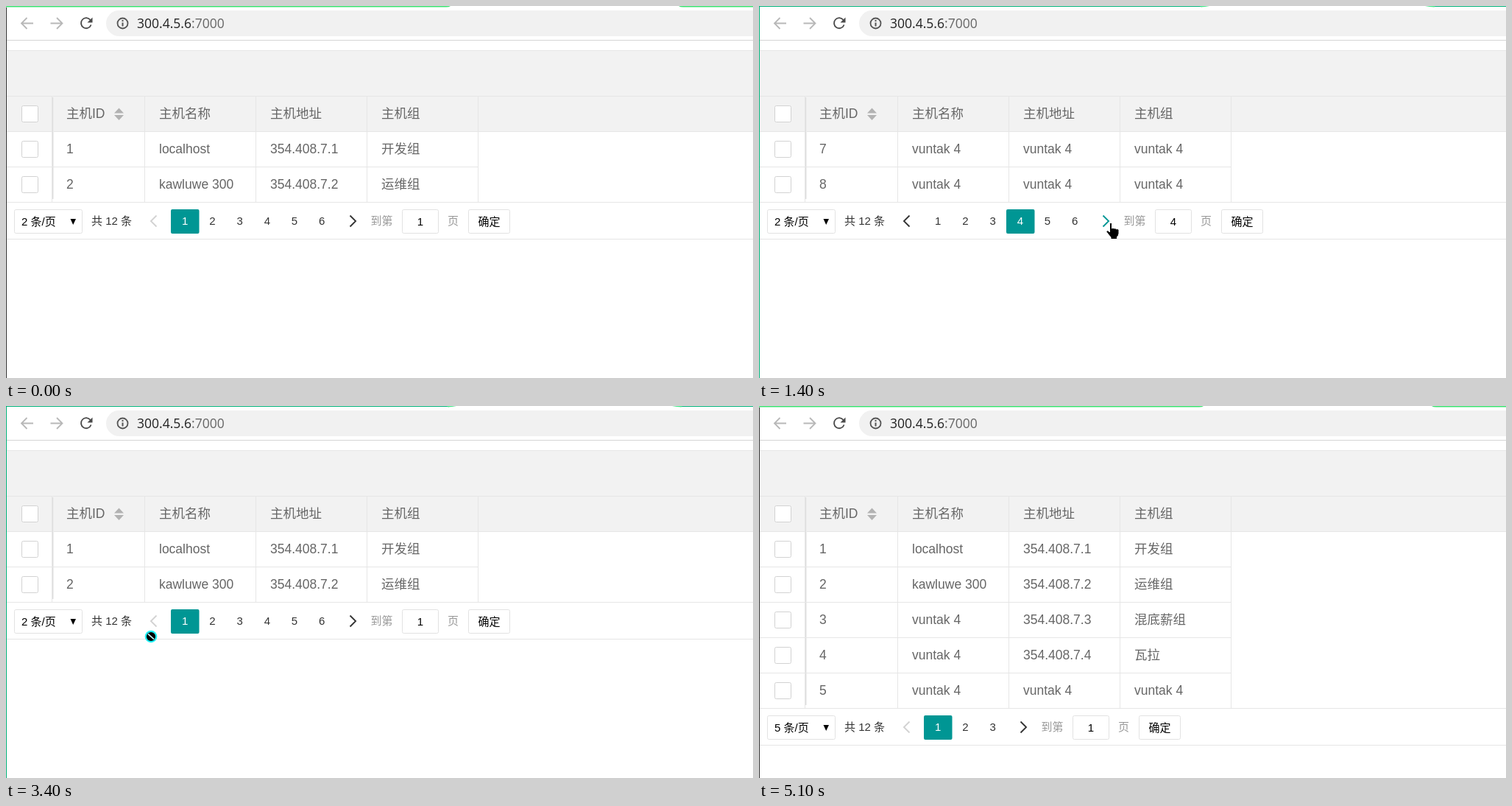
These frames come from a looping animation (1015x505 px, 5200 ms). An HTML page:

```html
<!DOCTYPE html>
<html lang="zh-CN">
<head>
<meta charset="utf-8">
<title>主机列表</title>
<style>
  html, body { margin: 0; width: 100%; height: 100%; overflow: hidden; background: #fff; }
  svg { display: block; width: 1015px; height: 505px; isolation: isolate; }
  text { font: 15px "Liberation Sans", "Noto Sans CJK SC", "Noto Sans CJK", sans-serif; white-space: pre; }
  .cell { font-size: 17.5px; fill: #666; }
  .url { font-family: "Open Sans", sans-serif; font-size: 17.5px; }
  .mid { text-anchor: middle; }
  .stroke { fill: none; stroke-width: 1.8; }
  .invert { mix-blend-mode: difference; fill: #fff; }
</style>
</head>
<body>
<svg id="stage" viewBox="0 0 1015 505">
  <rect width="1015" height="505" fill="#fff"/>
  <g id="chrome"></g>
  <g id="page"></g>
  <g id="cursor"></g>
</svg>
<script>
const LOOP = 5200, STEP = 100, ROW = 48;
const TEAL = '#009694', LINE = '#e6e6e6', EDGE = '#e2e2e2';
const SIZES = [2, 5, 10, 15, 20, 25];
const GROUPS = ['开发组', '运维组', '混底薪组', '瓦拉'];
const NAMES = ['localhost', 'kawluwe 300'];
const COMMON = 'vuntak 4';
const $ = id => document.getElementById(id);

const rect = (x, y, w, h, fill, extra = '') =>
  `<rect x="${x}" y="${y}" width="${w}" height="${h}" fill="${fill}" ${extra}/>`;
const box = (x, y, w, h, edge = EDGE, fill = '#fff') =>
  rect(x + .5, y + .5, w - 1, h - 1, fill, `rx="2" stroke="${edge}"`);
const hline = (y, w = 1014) => rect(1, y, w, 1, LINE);
const vline = (x, y, h) => rect(x, y, 1, h, LINE);
const label = (x, y, str, fill = '#333', cls = '') =>
  `<text x="${x}" y="${y}" fill="${fill}" class="${cls}">${str}</text>`;
const cell = (x, y, str) => label(x, y, str, '#666', 'cell');
const stroke = (d, color) => `<path d="${d}" class="stroke" stroke="${color}"/>`;
const shape = (d, fill) => `<path d="${d}" fill="${fill}"/>`;

// Every entry holds from its time until the next one.
const EVENTS = [
  [0, { page: 1, size: 2, input: 1, recording: false, hover: false, focus: false, selected: false, open: false, lit: -1, shown: 2 }],
  [500, { hover: true }],
  [800, { page: 2, input: 2, recording: true }],
  [1100, { page: 3, input: 3 }],
  [1400, { page: 4, input: 4 }],
  [1700, { page: 5, input: 5 }],
  [2000, { page: 6, input: 6, hover: false }],
  [2300, { focus: true }],
  [2500, { selected: true }],
  [2800, { input: 1, selected: false }],
  [3100, { page: 1, focus: false }],
  [3800, { open: true, lit: 0 }],
  [4000, { lit: 1 }],
  [4300, { open: false, shown: 5 }],
  [4500, { size: 5 }],
  [5100, { recording: false }]
];

// time, x, y, pointer kind
const PATH = [
  [100, 794, 234, 'arrow'], [500, 480, 289, 'hand'], [600, 476, 291, 'hand'],
  [1100, 478, 294, 'hand'], [2000, 500, 303, 'blocked'], [2100, 528, 302, 'arrow'],
  [2200, 565, 301, 'beam'], [2300, 592, 301, 'arrow'], [2400, 574, 301, 'beam'],
  [2500, 548, 302, 'beam'], [2600, 519, 306, 'arrow'], [2800, 560, 308, 'arrow'],
  [3000, 660, 308, 'hand'], [3100, 659, 299, 'hand'], [3200, 500, 303, 'arrow'],
  [3300, 320, 305, 'arrow'], [3400, 197, 313, 'blocked'], [3500, 140, 305, 'arrow'],
  [3700, 72, 298, 'arrow'], [3800, 70, 298, 'arrow'], [4000, 55, 337, 'arrow'],
  [4400, 55, 337, 'arrow'], [4800, 900, 400, 'arrow'], [4900, 1020, 420, 'none']
];

const POINTERS = {
  arrow: '<path class="invert" d="M0 0V14.5L3.3 11.5 5.8 17 8 16 5.6 10.6H10.2Z"/>',
  beam: '<path class="invert" d="M-3 -8H-.5V8H-3V9H4V8H1.5V-8H4V-9H-3Z"/>',
  hand: '<path stroke="#fff" d="M-1.5 1.5Q0 -1.5 1.5 1.5V8Q3 6.5 4.5 8Q6 7 7.5 8.8Q10 7.5 11 10.5V15Q10.5 18 8.5 19.5V22.5H0V20Q-3.5 16 -6 12.5Q-6 9.8 -3.5 11L-1.5 13Z"/>',
  blocked: '<circle r="8.3" fill="#1ceff4"/><circle r="6.1"/><path d="M-4 -3.6L4 3.6" stroke="#bff8fa" stroke-width="1.6"/>',
  none: ''
};

function stateAt(time) {
  return Object.assign({}, ...EVENTS.filter(e => e[0] <= time).map(e => e[1]));
}

function drawChrome(recording) {
  const frame = recording ? '#00b27a' : '#3ee373';
  const depth = recording ? 1 : 1.6;
  const pale = '#42e889';
  $('chrome').innerHTML =
    shape(`M0 0H604Q602 ${depth} 598 ${depth}H0ZM914 0H1015V${depth}H920Q916 ${depth} 914 0Z`, frame) +
    (recording ? shape('M600 0H612Q606 1.4 600 1.4ZM905 0H918V1.4Q911 1.4 905 0Z', pale) : '') +
    rect(0, recording ? 0 : 2, 1, 505, recording ? frame : '#333') +
    stroke('M37 23.5H21.5M28.5 16L21 23.5 28.5 31M60.5 23.5H76M69 16L76.5 23.5 69 31', '#b8b8b8') +
    stroke('M114.6 19A7 7 0 1 0 115.6 25.5', '#4a4a4a') +
    shape('M117.5 15.5V22.5H110.5Z', '#4a4a4a') +
    rect(136, 6, 900, 35, '#f1f1f1', 'rx="17.5"') +
    '<circle cx="158.5" cy="23.5" r="7" class="stroke" stroke="#555"/>' +
    rect(157.5, 22.5, 2, 5, '#555') + rect(157.5, 19, 2, 2, '#555') +
    label(178, 30, '300.4.5.6<tspan fill="#666">:7000</tspan>', '#222', 'url') +
    hline(46).replace(LINE, '#d4d4d4');
}

function drawTable(s) {
  const bottom = 170 + ROW * s.size;
  let out = rect(1, 60, 1014, 111, '#f2f2f2') + [60, 122, 170].map(y => hline(y)).join('');
  out += [188, 339, 490, 641].map(x => vline(x, 123, bottom - 123)).join('');
  out += vline(62, 123, bottom - 123) + rect(63, 124, 1, bottom - 128, '#dedede') + rect(64, 124, 1, bottom - 128, '#efefef');
  out += ['主机ID', '主机名称', '主机地址', '主机组']
    .map((title, i) => cell([82, 208, 359, 510][i], 152, title)).join('');
  out += shape('M147 145.5L153.5 138.5 160 145.5ZM147 148L153.5 155 160 148Z', '#b2b2b2');
  out += box(21, 135, 23, 23, '#d2d2d2');
  for (let r = 0; r < s.size; r++) {
    const index = (s.page - 1) * s.size + r, y = 200 + ROW * r;
    const address = index < 4 ? '354.408.7.' + (index + 1) : COMMON;
    out += box(21, y - 17, 23, 23, '#d2d2d2') + cell(82, y, index + 1) +
      cell(208, y, NAMES[index] || COMMON) + cell(359, y, address) +
      cell(510, y, GROUPS[index] || COMMON);
    if (r < s.size - 1) out += hline(y + 18, 641);
  }
  return out + hline(bottom);
}

function drawPager(s) {
  const pages = Math.ceil(12 / s.size), pitch = 37.2;
  const chevron = (x, dir, color) => stroke(`M${x - dir * 4} 284.5L${x + dir * 3.6} 292 ${x - dir * 4} 299.5`, color);
  const shift = Math.round((pages - 6) * pitch);
  const nextColor = s.page === pages ? '#d2d2d2' : s.hover ? TEAL : '#333';
  let out = box(11, 276, 93, 33, s.open ? TEAL : EDGE) + label(21, 298, s.shown + ' 条/页', '#000') +
    shape('M87.5 289H95L91.2 297Z', '#000') + label(116, 297, '共 12 条') +
    chevron(200.5, -1, s.page === 1 ? '#d2d2d2' : '#333');
  for (let n = 1; n <= pages; n++) {
    const x = 224 + pitch * (n - 1), active = n === s.page;
    if (active) out += rect(Math.round(x), 276, 38.5, 33, TEAL, 'rx="2"');
    out += label(x + 19.2, 297, n, active ? '#fff' : '#333', 'mid');
  }
  out += `<g transform="translate(${shift})">` + chevron(471.5, 1, nextColor) +
    label(495.5, 297, '到第', '#999') + box(538, 276, 50, 33, s.focus ? TEAL : EDGE) +
    (s.selected ? rect(558.5, 284, 9, 17, '#2f9bff') : '') +
    label(563, 298, s.input, s.selected ? '#fff' : '#000', 'mid') +
    label(600, 297, '页', '#999') + box(628, 276, 57, 33) + label(656.5, 298, '确定', '#000', 'mid') + '</g>';
  return `<g transform="translate(0 ${ROW * (s.size - 2)})">${out}${hline(316)}</g>`;
}

function drawMenu(s) {
  if (!s.open) return '';
  return rect(11, 309, 92, 128, '#fff') + rect(11, 309, 1, 128, '#888') + rect(11, 436, 92, 1, '#888') +
    SIZES.map((size, i) => {
      const lit = i === s.lit;
      return (lit ? rect(12, 309 + 21 * i, 91, 21, '#26a5ff') : '') +
        label(21, 325 + 21 * i, size + ' 条/页', lit ? '#fff' : '#000');
    }).join('');
}

function drawCursor(time) {
  const i = PATH.findLastIndex(p => p[0] <= time);
  if (i < 0) return '';
  const [t0, x0, y0, kind] = PATH[i], [t1, x1, y1] = PATH[i + 1] || [LOOP, x0, y0];
  // A hand or blocked pointer rests until the next move.
  const part = kind === 'hand' || kind === 'blocked' ? 0 : (time - t0) / (t1 - t0);
  const at = (a, b) => a + (b - a) * part;
  const art = POINTERS[kind].replaceAll('/>', ` transform="translate(${at(x0, x1)} ${at(y0, y1)})"/>`);
  return art;
}

let last = -1;
function tick(now) {
  const time = Math.floor(now % LOOP / STEP) * STEP;
  if (time !== last) {
    last = time;
    const s = stateAt(time);
    drawChrome(s.recording);
    $('page').innerHTML = drawTable(s) + drawPager(s) + drawMenu(s);
    $('cursor').innerHTML = drawCursor(time);
  }
  requestAnimationFrame(tick);
}
const start = performance.now();
tick(0);
requestAnimationFrame(function run() { tick = tick; });
</script>
</body>
</html>
```
